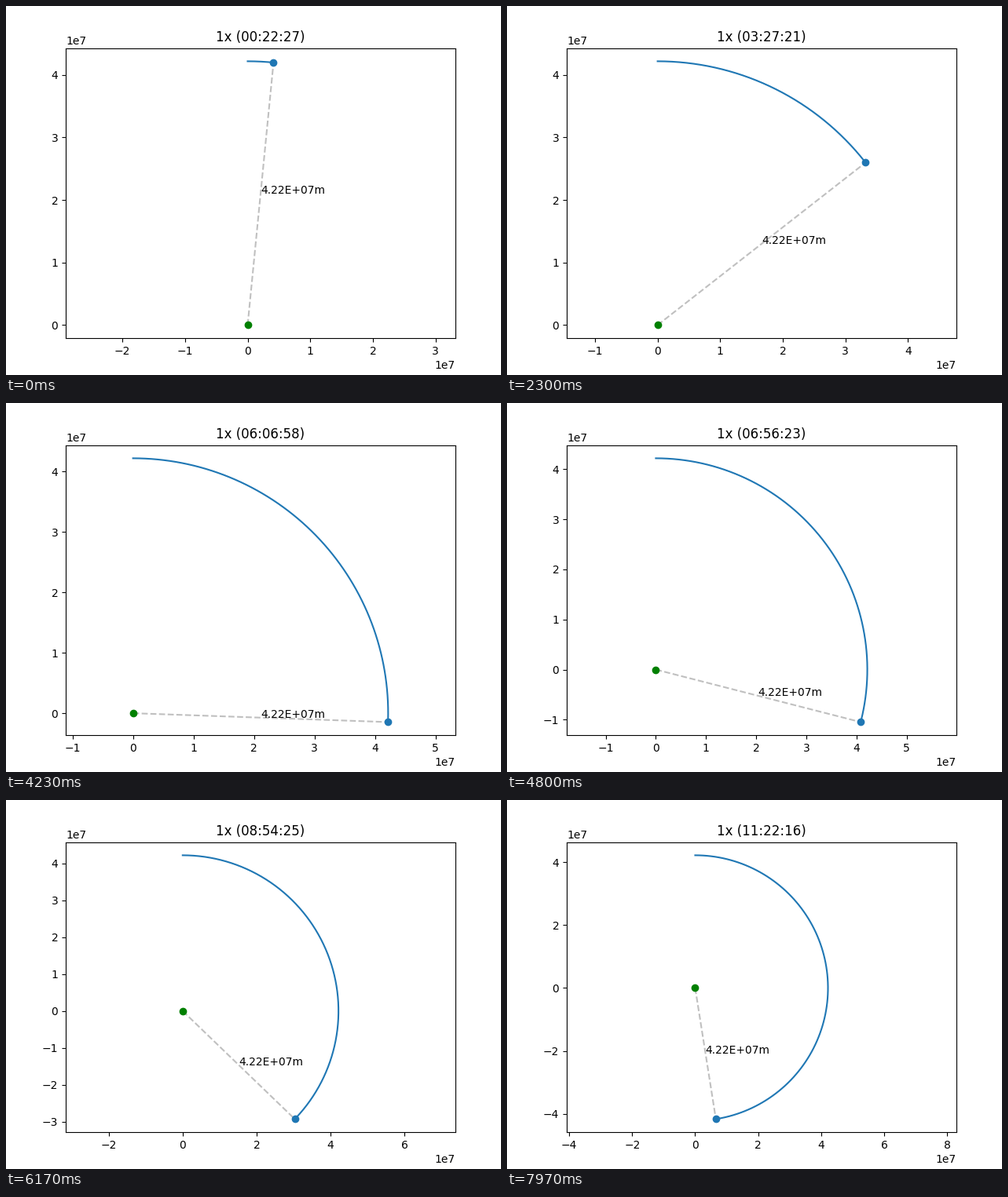
Animation of 630 by 470 pixels, one loop 8000 ms. Source, as a matplotlib script:

```python
import numpy as np
import matplotlib.pyplot as plt
from matplotlib.animation import FuncAnimation

W, H, DPI = 630, 470, 100
INTERVAL, FRAMES = 25, 320
RADIUS = 4.2164e7        # geostationary orbit, m
PERIOD = 86164           # sidereal day, s
MARGIN = 0.05
AX_W, AX_H = 496, 369.6  # plot area, px

# simulated clock (s) at a few steps; the rate drifts slightly
KEY_STEPS = [0, 34, 69, 127, 162, 209, 239]
KEY_CLOCK = [1347, 6596, 12441, 22018, 28122, 36179, 40936]

fig = plt.figure(figsize=(W / DPI, H / DPI), dpi=DPI, facecolor="white")
ax = fig.add_axes([76 / W, 46.8 / H, AX_W / W, AX_H / H])

link, = ax.plot([], [], "--", color="silver", lw=1.5)
trail, = ax.plot([], [], color="C0", lw=1.5)
planet, = ax.plot([0], [0], "o", color="green")
craft, = ax.plot([], [], "o", color="C0")
label = ax.text(0, 0, "")
title = ax.set_title("")


def step_at(frame):
    """Three steps per 100 ms, the last one held for two frames."""
    block, part = divmod(frame, 4)
    return 3 * block + min(part, 2)


def orbit(clock):
    angle = 2 * np.pi * clock / PERIOD
    return RADIUS * np.sin(angle), RADIUS * np.cos(angle)


def fit_view(xs, ys):
    """Equal scale on both axes, centred on the data."""
    low, high = min(0, ys.min()), ys.max()
    half_h = (high - low) * (0.5 + MARGIN)
    half_w = half_h * AX_W / AX_H
    mid_x, mid_y = xs.max() / 2, (low + high) / 2
    ax.set_xlim(mid_x - half_w, mid_x + half_w)
    ax.set_ylim(mid_y - half_h, mid_y + half_h)


def draw(frame):
    clock = int(round(np.interp(step_at(frame), KEY_STEPS, KEY_CLOCK)))
    xs, ys = orbit(np.linspace(0, clock, 200))
    x, y = xs[-1], ys[-1]
    trail.set_data(xs, ys)
    craft.set_data([x], [y])
    link.set_data([0, x], [0, y])
    label.set_position((x / 2, y / 2))
    label.set_text(f"{np.hypot(x, y):.2E}m")
    minutes, sec = divmod(clock, 60)
    hours, minutes = divmod(minutes, 60)
    title.set_text(f"1x ({hours:02d}:{minutes:02d}:{sec:02d})")
    fit_view(xs, ys)
    return link, trail, planet, craft, label, title


anim = FuncAnimation(fig, draw, frames=FRAMES, init_func=lambda: draw(0),
                     interval=INTERVAL, repeat=True, repeat_delay=0)
plt.show()
```
